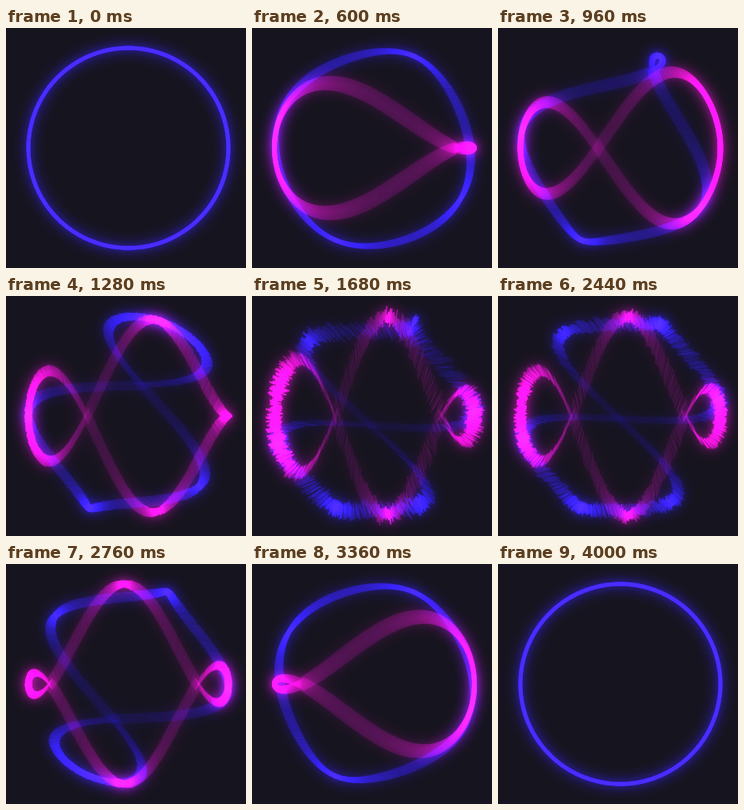
An HTML page with a canvas that plays this animation: 300 by 300 pixels, repeating every 4.04 s.

```html
<!DOCTYPE html>
<html lang="en">
<head>
<meta charset="utf-8">
<title>Twisting neon ring</title>
<style>
html, body { margin: 0; width: 100%; height: 100%; overflow: hidden; background: #16141e; }
canvas { display: block; width: 300px; height: 300px; }
</style>
</head>
<body>
<canvas id="stage" width="300" height="300"></canvas>
<script>
const SIZE = 300, CX = 153, CY = 150, RADIUS = 125, THICK = 5;
const LOOP = 4040, STEP = 40, SPAN = 4000, RODS = 500;
const TAU = Math.PI * 2, DEG = Math.PI / 180;
const BG = '#16141e';

const stage = document.getElementById('stage').getContext('2d');

let seed = 7;
const random = () => (seed = (seed * 16807) % 2147483647) / 2147483647;
const rods = Array.from({ length: RODS }, (_, i) => ({
  angle: i * TAU / RODS, reach: random(), shift: random() - 0.5
}));

// Progress and turn (degrees) of the pink ring: it lingers after half a turn.
const PINK_TURN = [[0, 0], [0.15, 60], [0.32, 143], [0.68, 182], [0.84, 300], [1, 360]];

// Smooth curve through [time, value] keys.
function track(keys, t) {
  const last = keys.length - 1;
  let k = 0;
  while (k < last - 1 && t >= keys[k + 1][0]) k++;
  const slope = i => {
    const [a, b] = [keys[Math.max(i - 1, 0)], keys[Math.min(i + 1, last)]];
    return (b[1] - a[1]) / (b[0] - a[0]);
  };
  const [t0, v0] = keys[k], [t1, v1] = keys[k + 1];
  const d = t1 - t0, u = (t - t0) / d, w = 1 - u;
  return w * w * (1 + 2 * u) * v0 + u * u * (3 - 2 * u) * v1
    + d * u * w * (w * slope(k) - u * slope(k + 1));
}

const cubicInOut = t => t < 0.5 ? 4 * t ** 3 : 1 - 4 * (1 - t) ** 3;

function makeRing(color, axis, turn, fade) {
  const g = document.createElement('canvas').getContext('2d');
  g.canvas.width = g.canvas.height = SIZE;
  g.strokeStyle = color;
  g.lineWidth = 1.9;
  return { g, cos: Math.cos(axis * DEG), sin: Math.sin(axis * DEG), turn, fade };
}

const rings = [
  makeRing('rgb(42,20,255)', 67, t => 360 * cubicInOut(t), () => 1),
  makeRing('rgb(255,8,222)', 0, t => track(PINK_TURN, t), t => Math.min(1, t * 10, (1 - t) * 10))
];

// Each rod spins about the ring's axis, by an angle that grows along that axis.
function drawRing({ g, cos, sin, turn, fade }, t) {
  const swell = Math.sin(Math.PI * t) ** 2, fuzz = swell ** 8;
  const twist = 178 * swell, base = turn(t), opacity = 0.95 * fade(t) / (1 + 0.8 * fuzz);
  g.clearRect(0, 0, SIZE, SIZE);
  for (const { angle, reach, shift } of rods) {
    const along = Math.cos(angle), across = Math.sin(angle);
    const tilt = (base + twist * along) * DEG;
    const depth = across * Math.cos(tilt);
    const smear = Math.abs(0.19 * RADIUS * across * Math.sin(tilt));
    const length = THICK + 4 * swell + 22 * fuzz * reach;
    const r = RADIUS + 12 * fuzz * shift;
    const place = (p, q) => [p * cos + q * sin, q * cos - p * sin];
    const [x, y] = place(r * along, r * depth);
    const [dx, dy] = place(length * along, length * depth + (depth < 0 ? -smear : smear));
    g.globalAlpha = opacity / (1 + smear / THICK) ** 1.35;
    g.beginPath();
    g.moveTo(CX + x - dx / 2, CY + y - dy / 2);
    g.lineTo(CX + x + dx / 2, CY + y + dy / 2);
    g.stroke();
  }
}

function glow(canvas) {
  for (const [blur, alpha] of [[9, 0.9], [4, 0.4], [0, 1]]) {
    stage.filter = blur ? `blur(${blur}px)` : 'none';
    stage.globalAlpha = alpha;
    stage.drawImage(canvas, 0, 0);
  }
}

function frame() {
  const now = Math.floor(performance.now() % LOOP / STEP) * STEP;
  const t = Math.min(1, now / SPAN);
  stage.globalCompositeOperation = 'source-over';
  stage.globalAlpha = 1;
  stage.filter = 'none';
  stage.fillStyle = BG;
  stage.fillRect(0, 0, SIZE, SIZE);
  stage.globalCompositeOperation = 'lighter';
  for (const ring of rings) {
    drawRing(ring, t);
    glow(ring.g.canvas);
  }
  requestAnimationFrame(frame);
}
frame();
</script>
</body>
</html>
```
